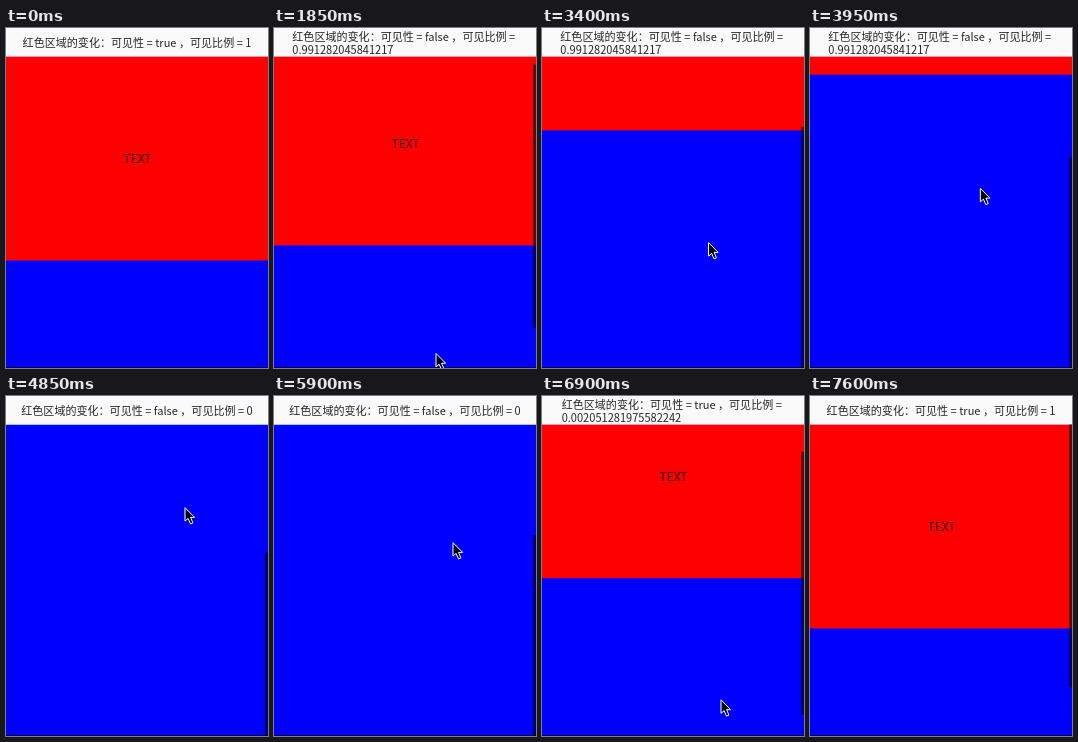
An HTML page that plays this animation: 262 by 340 pixels, repeating every 8.15 s.

```html
<!DOCTYPE html>
<html lang="zh-CN">
<head>
<meta charset="utf-8">
<title>可见区域变化</title>
<style>
  html, body { margin: 0; width: 100%; height: 100%; overflow: hidden; background: #fafafa; }
  svg { display: block; width: 262px; height: 340px; }
  #header {
    position: absolute; top: 0; left: 0; width: 262px; height: 29px;
    display: flex; align-items: center; justify-content: center;
    white-space: pre; color: #262626;
    font: 11.05px/13px "Noto Sans CJK SC", "Noto Sans CJK", sans-serif;
  }
  #label { font: 300 12px "Noto Sans CJK SC", "Noto Sans CJK", sans-serif; fill-opacity: .8; }
</style>
</head>
<body>
<svg viewBox="0 0 262 340">
  <rect y="28.5" width="262" height="311.5" fill="#00f"/>
  <rect id="red" y="28.5" width="262" fill="#f00"/>
  <text id="label" x="131.5" text-anchor="middle">TEXT</text>
  <rect y="339" width="262" height="1" fill="#000048"/>
  <rect width="262" height="28.5" fill="#fafafa"/>
  <g id="overlay">
    <rect id="bar" x="259" width="3" height="263" opacity=".6"/>
    <path id="cursor" d="M0 0V13.5L3.1 10.8L5.5 16.3L7.9 15.3L5.6 9.8H9.6Z" stroke="#fff"/>
  </g>
</svg>
<div id="header"><span id="status"></span></div>
<script>
const LOOP = 8150, START = 1680, TOP = 28.5, RED = 204;
const [red, label, overlay, bar, cursor, status] =
  ['red', 'label', 'overlay', 'bar', 'cursor', 'status'].map(id => document.getElementById(id));

// drag path: time, scroll offset
const drag = [
  [0, 0], [START, 0], [1850, 15], [2650, 69], [3400, 130], [4150, 206], [4850, 237],
  [5430, 237], [6250, 181], [6400, 177], [7100, 0], [LOOP, 0]
];

function scrollAt(t) {
  const i = drag.findIndex(k => k[0] > t);
  const [t0, s0] = drag[i - 1], [t1, s1] = drag[i];
  return s0 + (s1 - s0) * (t - t0) / (t1 - t0);
}

function describe(t, scroll) {
  const leaving = t < 4850;
  let visible = !leaving, ratio = leaving ? '\n0.991282045841217' : '\n0.002051281975582242';
  if (scroll < 1) [visible, ratio] = [true, '1'];
  else if (scroll > RED) [visible, ratio] = [false, '0'];
  return `红色区域的变化：可见性 = ${visible} ，可见比例 = ${ratio}`;
}

function draw() {
  const t = performance.now() % LOOP, scroll = scrollAt(t);
  red.setAttribute('height', Math.max(0, RED - scroll));
  label.setAttribute('y', 135 - scroll);

  // the pointer follows the drag with a slow sideways and downward drift
  const drift = Math.min(1, Math.max(0, (t - 1850) / 3000));
  const x = 162 + 17 * drift ** 2, y = 335.5 + t * .0027 - scroll;
  cursor.setAttribute('transform', `translate(${x} ${y})`);
  bar.setAttribute('y', TOP + scroll * .54);
  overlay.style.display = t < START ? 'none' : '';

  const text = describe(t, scroll);
  if (status.textContent !== text) status.textContent = text;
  requestAnimationFrame(draw);
}
draw();
</script>
</body>
</html>
```
